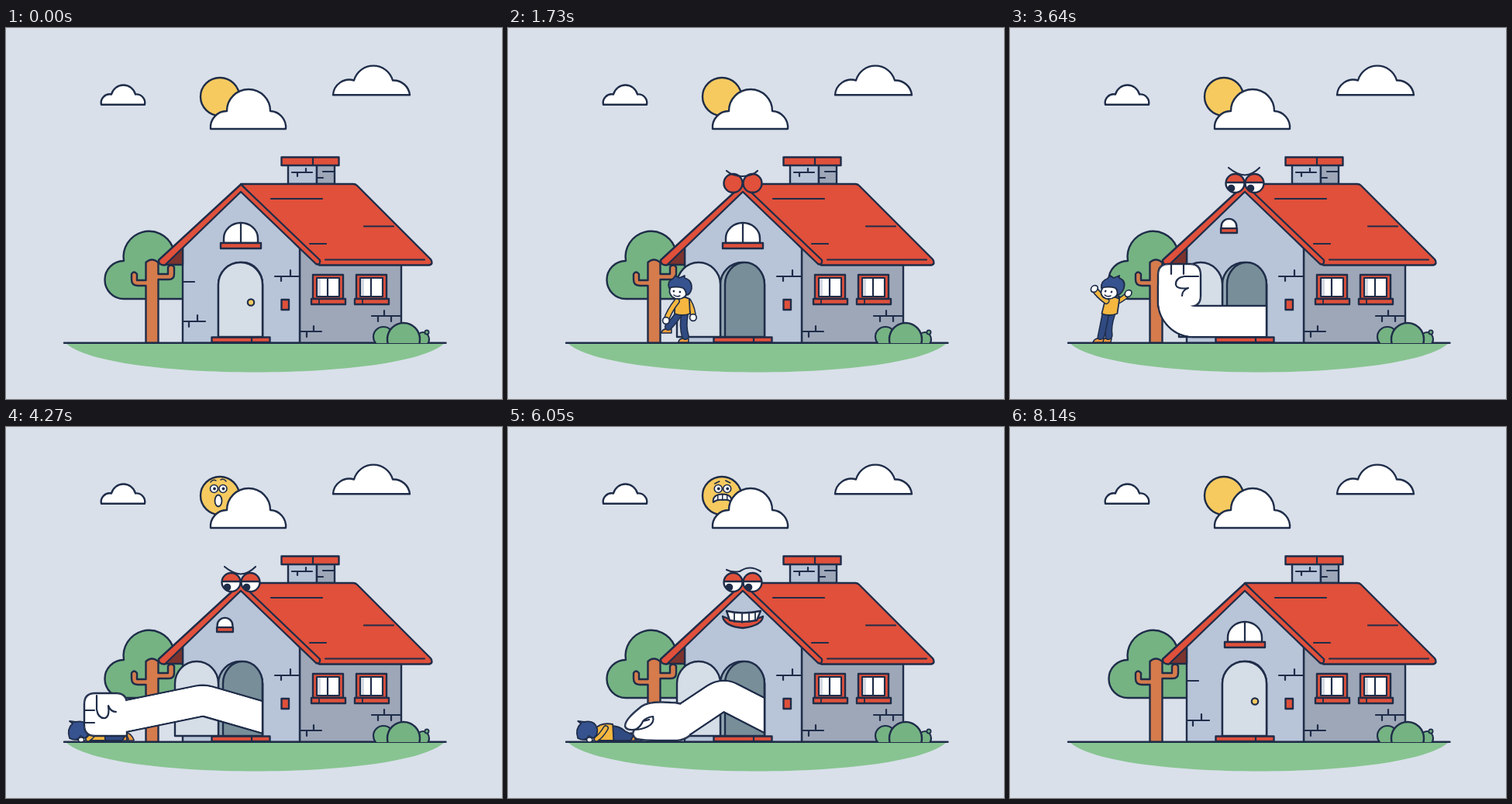
An HTML page with a canvas for the animation above (8.22 s loop, 640 px wide and 478 px high).

```html
<!DOCTYPE html>
<html lang="en">
<head>
<meta charset="utf-8">
<title>Hungry house</title>
<style>
html, body { margin: 0; width: 100%; height: 100%; overflow: hidden; background: #d9e0ea; }
canvas { display: block; }
</style>
</head>
<body>
<canvas id="stage" width="640" height="478"></canvas>
<script>
const ctx = document.getElementById('stage').getContext('2d');
const LOOP = 8220;
const INK = '#1f2d49', RED = '#e0503b', WALL = '#b8c4d8', SIDE = '#9da7b8',
  DOOR = '#d5dde7', GREEN = '#75b383', BARK = '#d57b4c', SUN = '#f6ca5f',
  SHIRT = '#f5b73f', HAIR = '#36528f', PANTS = '#304a82', SHOE = '#ee9a3d';
const DOOR_EDGE = 331;

// Eased interpolation through keys of the form [time, ...values].
function track(t, keys) {
  if (t <= keys[0][0]) return keys[0].slice(1);
  for (let i = 1; i < keys.length; i++) {
    const a = keys[i - 1], b = keys[i];
    if (t < b[0]) {
      const u = (t - a[0]) / (b[0] - a[0]);
      const e = u * u * (3 - 2 * u);
      return a.slice(1).map((v, k) => v + (b[k + 1] - v) * e);
    }
  }
  return keys[keys.length - 1].slice(1);
}
const ramp = (t, from, to) => track(t, [[from, 0], [to, 1]])[0];

function draw(d, fill, width = 2.4) {
  const path = new Path2D(d);
  if (fill) { ctx.fillStyle = fill; ctx.fill(path); }
  if (width) { ctx.strokeStyle = INK; ctx.lineWidth = width; ctx.stroke(path); }
}
const line = (d, width = 2.2) => draw(d, null, width);
const box = (x, y, w, h, fill, width) => draw(`M${x},${y}h${w}v${h}h${-w}z`, fill, width);
function oval(x, y, rx, ry, fill, width = 2.2) {
  ctx.beginPath();
  ctx.ellipse(x, y, rx, ry, 0, 0, Math.PI * 2);
  ctx.fillStyle = fill;
  ctx.fill();
  if (width) { ctx.strokeStyle = INK; ctx.lineWidth = width; ctx.stroke(); }
}
function limb(d, color, width) {
  const path = new Path2D(d);
  ctx.strokeStyle = INK; ctx.lineWidth = width + 3; ctx.stroke(path);
  ctx.strokeStyle = color; ctx.lineWidth = width; ctx.stroke(path);
}
function group(paint) { ctx.save(); paint(); ctx.restore(); }
function insideDoorway(paint) {
  group(() => {
    ctx.beginPath();
    ctx.rect(0, 0, DOOR_EDGE + 0.5, 478);
    ctx.clip();
    paint();
  });
}

function sky(t) {
  oval(276, 88.5, 25, 24.5, SUN, 2.4);
  sunFace(t);
  draw('M264,130A21,21 0 0 1 285,107A28,28 0 0 1 341,107A21,21 0 0 1 361,130z', '#fff');
  draw('M123,98.7A11,11 0 0 1 136,85.5A16,16 0 0 1 167,85.5A11,11 0 0 1 179,98.7z', '#fff');
  draw('M422,86.3A21,21 0 0 1 449,67.5A26,26 0 0 1 499,67.5A21,21 0 0 1 521,86.3z', '#fff');
}

function sunFace(t) {
  const show = ramp(t, 3980, 4120) * (1 - ramp(t, 7680, 7840));
  if (!show) return;
  const grimace = t > 5350;
  const shift = track(t, [[5250, 0], [5500, 2.5], [7200, 3.5]])[0];
  group(() => {
    ctx.globalAlpha = show;
    ctx.translate(shift, 0);
    for (const x of [268.5, 280]) {
      oval(x, 79.5, 5, 5, '#fff', 1.6);
      oval(x + 0.5, 79.5, 1.9, 1.9, INK, 0);
    }
    if (grimace) {
      line('M264,73L270,70M278,69L284,72', 1.6);
      draw('M262,97Q261,87 274,86.5Q287,87 285,96Q281,93 274,94Q267,93 262,97z', '#fff', 2);
      line('M268,88V94M274,87V93M280,88V93', 1.5);
    } else {
      line('M264,71Q267,67 271,69M277,68Q281,66 284,70', 1.5);
      oval(274, 95, 4.5, 7.5, '#fff', 1.8);
    }
  });
}

function tree() {
  draw('M152,349A24.5,24.5 0 0 1 152,300A33,33 0 0 1 215,282Q223,279 229,283V349z', GREEN);
  draw('M180.5,406V332H170Q162,332 162,324V317Q165,312 169,317V325H180.5V302'
    + 'Q188,295 196.5,302V317H209V308Q213,303 217,308V317Q217,324 210,324H196.5V406z', BARK);
}

function sideWindow(x) {
  box(x, 318, 39, 31, RED);
  box(x + 5, 322, 29, 24, '#fff', 2.2);
  box(x + 6, 323, 4, 22, '#d3d9e1', 0);
  line(`M${x + 19},322V346`);
  box(x - 2, 349, 44, 7, RED);
  line(`M${x + 8},349V356`, 1.8);
}

function house() {
  box(364, 176, 37, 25, WALL);
  box(401, 176, 23, 25, SIDE);
  line('M369,186H395M376,186V191M387,181V186M409,185H423M402,193H409');
  box(355.5, 166.5, 74, 10.5, RED);
  line('M396,167V177');

  draw('M379,280L404,305H510V406H379z', SIDE);
  draw('M228,406V272L303,206L379,284V406z', WALL);
  draw('M228,277V305H203z', '#7d332d');
  draw('M303,201H448Q451,201 453,203L548,298Q552,304 546,305.5H404z', RED);
  draw('M303,201.5L197,299Q197,306 205,305.5L303,211L400,304Q406,306 405,299z', RED);
  line('M342,220H408M462,255.5H500M392,278H413M412,298.5H540');
  line('M228,327H243M228,378H257M236,378V385M247,370V378');
  line('M347,320H379M355,320V326M367,312V320');
  line('M379,391H407M388,391V398M397,384V391M472,371H510M480,371V378M488,364V371M497,371V378');
  box(355.5, 350, 9.5, 13, RED);
  sideWindow(396);
  sideWindow(452);
}

function arch(left, right) {
  const r = Math.abs(right - left) / 2;
  return `M${left},398V330.5A${r},28.5 0 0 ${right > left ? 1 : 0} ${right},330.5V398z`;
}

function doorway(t) {
  const swing = track(t, [[190, 1], [720, -1], [7470, -1], [7920, 1]])[0];
  draw(arch(274, DOOR_EDGE), '#94a7b3');
  draw(arch(280, DOOR_EDGE), '#788f9a');
  box(265.5, 398.5, 75, 6.5, RED);
  line('M317,398V405');
  draw(arch(274, 274 + (swing > 0 ? 57 : 56) * swing), DOOR);
  if (swing > 0.1) oval(274 + 42 * swing, 353.5, 4.2 * swing, 4.2, SUN);
}

function windowMouth(t) {
  if (t > 5520 && t < 6760) {
    const grow = track(t, [[5520, 0.4], [5720, 1], [6600, 1], [6760, 0.5]])[0];
    group(() => {
      ctx.translate(303, 248);
      ctx.scale(grow, grow);
      ctx.translate(-303, -248);
      draw('M277,244Q303,256 329,244Q328,256 303,259Q279,257 277,244z', RED);
      draw('M282,237Q303,242 326,237L321,249Q303,253 286,249z', '#fff');
      line('M292,239V251M302,240V252M311,240V251M319,239V249', 1.8);
    });
    return;
  }
  const [x, y, sx, sy] = track(t, [[2080, 303, 280, 1, 1], [2350, 282.5, 259.5, 0.4, 0.47],
    [6760, 282.5, 259.5, 0.4, 0.47], [6960, 303, 280, 1, 1]]);
  const rx = 22 * sx * (1.2 - 0.2 * sx);
  const base = y - 3 * sy, half = 26 * sx;
  draw(`M${x - rx},${base}V${base - 6 * sy}A${rx},${20 * sy} 0 0 1 ${x + rx},${base - 6 * sy}V${base}z`, '#fff');
  if (sx > 0.6) line(`M${x},${base - 26 * sy}V${base}`);
  box(x - half, base, half * 2, 7 * Math.max(sy, 0.85), RED);
}

function houseEyes(t) {
  const rise = ramp(t, 1420, 1650) * (1 - ramp(t, 6720, 6960));
  if (!rise) return;
  const open = ramp(t, 1900, 2120) * (1 - ramp(t, 6540, 6720));
  group(() => {
    ctx.translate(303, 211);
    ctx.scale(rise, rise);
    ctx.translate(-303, -211);
    for (const x of [290.5, 315.5]) {
      oval(x, 200, 12, 11.8, '#fff', 0);
      group(() => {
        ctx.beginPath();
        ctx.arc(x, 200, 12, 0, Math.PI * 2);
        ctx.clip();
        oval(x - 5, 206.5, 4.8, 4.8, INK, 0);
        const lid = 212 - 13 * open;
        box(x - 13, 186, 26, lid - 186, RED, 2.4);
      });
      ctx.beginPath();
      ctx.arc(x, 200, 12, 0, Math.PI * 2);
      ctx.lineWidth = 2.4;
      ctx.stroke();
    }
    if (t > 5520) line('M282,184Q290,188 299,186Q312,177 326,186');
    else if (open < 0.5) line('M282,184Q290,191 302,191M322,184Q315,191 303,191');
    else line('M282,180Q293,189 303,189.5Q313,189 322,180');
  });
}

function walker(t) {
  const x = t < 2520 ? 224 - (t - 1730) * 0.118 : track(t, [[2520, 130.8], [3300, 120]])[0];
  const moving = 1 - ramp(t, 2350, 2520);
  const stride = Math.cos((t - 1730) / 440 * Math.PI) * moving;
  const lean = 0.2 * ramp(t, 2700, 3300);
  const [lx, ly, rx, ry] = track(t, [[2600, -20, -28, 15, -32], [3250, -25, -69, 20, -63]]);
  const sway = moving * 4 * (stride - 1);
  const foot = s => s > 0 ? [-18 * s, -12 * s] : [-4 * s, 0];
  group(() => {
    ctx.translate(x, 405 - 6 * Math.min(1, Math.max(0, (x - 268) / 10)));
    ctx.transform(1, 0, -lean, 1, 0, 0);
    [[-stride, 5], [stride, -5]].forEach(([s, side]) => {
      const [fx, fy] = foot(s);
      const px = fx + side * (1 - Math.abs(stride));
      draw(`M${px - 8},${fy}Q${px - 7},${fy - 6} ${px + 1},${fy - 5}H${px + 5}V${fy}z`, SHOE, 1.6);
      limb(`M${side * 0.8},-36Q${px * 0.55 - 1},${-20 + fy / 2} ${px + 1},${fy - 8}`, PANTS, 7);
    });
    limb(`M9,-53Q${(9 + rx) / 2 + 3},${(ry - 53) / 2} ${rx},${ry}`, SHIRT, 5);
    oval(rx, ry, 4.3, 4.3, '#fff', 1.7);
    draw('M-8,-57Q2,-61 10,-56L11,-37Q1,-33 -9,-37z', SHIRT, 1.8);
    limb(`M-6,-53Q${(lx - 6) / 2 - 3},${(ly - 53) / 2} ${lx - sway},${ly}`, SHIRT, 5);
    oval(lx - sway, ly, 4.3, 4.3, '#fff', 1.7);
    oval(-4, -66, 11.5, 10, '#fff', 1.8);
    draw('M-16,-70Q-19,-79 -11,-82L-8,-86L-3,-83L4,-86L4,-83Q14,-80 13,-69Q11,-61 6,-61Q6,-67 2,-70Q-7,-73 -16,-70z', HAIR, 1.8);
    oval(-10, -66, 1.3, 1.6, INK, 0);
    oval(-2, -65, 1.3, 1.6, INK, 0);
    line('M-10,-61Q-6,-58 -2,-60', 1.4);
  });
}

function fallen(t) {
  const dx = t < 5980 ? 8 * ramp(t, 5680, 5960) : 8 + Math.max(0, t - 6050) * 0.1754;
  if (dx > 262) return;
  const lift = -5 * Math.min(1, Math.max(0, (dx - 160) / 30));
  group(() => {
    ctx.translate(dx, lift);
    draw('M148,404L150,394Q155,394 158,402L157,404zM156,404L155,394Q161,394 165,403V404z', SHOE, 1.6);
    draw('M124,385Q136,385 143,392L154,397L150,404H122z', PANTS, 1.8);
    draw('M104,389Q112,380 127,383L128,404H106z', SHIRT, 1.8);
    oval(98, 399, 9, 5.5, '#fff', 1.7);
    draw('M82,401Q78,389 86,382L82,379L90,380Q104,377 107,389Q108,397 102,401L96,398Q92,406 82,401z', HAIR, 1.8);
    limb('M118,388Q112,398 106,402', SHIRT, 4.5);
    oval(97, 403, 3.6, 3, '#fff', 1.6);
  });
}

// Elbow x/y, wrist x/y and hand angle in degrees (0 is up, -90 is left).
const ARM = [
  [2700, 430, 378, 380, 378, -90],
  [3120, 250, 378, 205, 378, -90],
  [3400, 211, 378, 211, 345, 0],
  [3640, 211, 378, 211, 331, 0],
  [3860, 211, 378, 211, 276, 6],
  [4010, 255, 352, 128, 378, -90],
  [4300, 255, 352, 128, 378, -90],
  [4700, 211, 378, 211, 278, 0],
  [5130, 211, 378, 211, 278, 0],
  [5580, 275, 338, 212, 376, -90],
  [5780, 277, 344, 212, 382, -90],
  [5960, 277, 344, 220, 382, -90],
  [6050, 277, 344, 220, 382, -90]
];
const FIST = 'M-6,-27H21Q35,-27 35,-13V14Q35,28 21,28H-20V-13Q-20,-27 -6,-27z';
const PALM = 'M10,-22Q2,-27 -10,-27C-24,-28 -40,-28 -48,-22C-58,-14 -70,-4 -69,4'
  + 'Q-67,9 -57,8Q-62,15 -54,20Q-45,22 -28,22H-2Q8,21 15,15z';

function arm(t) {
  if (t < 2700 || t > 7200) return;
  let [ex, ey, wx, wy, angle] = track(t, ARM);
  if (t > 6050) {
    const pull = (t - 6050) * 0.1754;
    ex += pull;
    wx += pull;
    ey += Math.min(30, pull * 0.2);
  }
  const grabbing = t > 5260;
  const hand = new Path2D(grabbing ? PALM : FIST);
  const turn = (angle + (grabbing ? 90 : 0)) * Math.PI / 180;
  const sx = Math.max(345, ex + 70);
  const reach = Math.hypot(wx - ex, wy - ey);
  const bend = new Path2D();
  bend.moveTo(sx, grabbing ? track(t, [[5260, 378], [5580, 380]])[0] : 378);
  bend.arcTo(ex, ey, wx, wy, Math.min(grabbing ? 18 : 26, reach * 0.75));
  bend.lineTo(wx, wy);
  const atWrist = paint => group(() => {
    ctx.translate(wx, wy);
    ctx.rotate(turn);
    paint();
  });

  insideDoorway(() => {
    ctx.lineCap = 'butt';
    ctx.strokeStyle = INK;
    ctx.lineWidth = 42.4;
    ctx.stroke(bend);
    atWrist(() => { ctx.lineWidth = 2.4; ctx.stroke(hand); });
    ctx.strokeStyle = '#fff';
    ctx.lineWidth = 37.6;
    ctx.stroke(bend);
    ctx.lineCap = 'round';
    atWrist(() => {
      // Shrinking the fill keeps the full outline around the hand.
      ctx.fillStyle = '#fff';
      ctx.save();
      ctx.clip(hand);
      ctx.fill(hand);
      ctx.strokeStyle = INK;
      ctx.lineWidth = 2.4;
      ctx.stroke(hand);
      ctx.restore();
    });
    ctx.lineCap = 'butt';
    ctx.strokeStyle = '#fff';
    ctx.lineWidth = 37.6;
    ctx.stroke(bend);
    ctx.lineCap = 'round';
    atWrist(() => {
      if (grabbing) line('M-57,8Q-50,6 -46,-3Q-42,-8 -33,-9Q-31,0 -40,4Q-48,8 -57,8M-46,-3L-38,-5');
      else line('M-3,-26V-14M13,-26V-14M32,-11H14Q2,-9 3,0Q5,6 19,4Q11,7 11,14');
    });
  });
  line(`M${DOOR_EDGE},330V398`, 2.4);
}

function bush() {
  group(() => {
    ctx.beginPath();
    ctx.rect(460, 370, 100, 36);
    ctx.clip();
    oval(487, 398, 13, 13, GREEN);
    oval(538, 401, 8, 9, GREEN);
    oval(543, 392, 2.6, 2.6, GREEN, 1.8);
    oval(513, 401, 21, 21, GREEN, 2.4);
  });
}

function ground() {
  draw('M77,406C130,456 513,456 566,406z', '#88c491', 0);
  line('M75,405.8H567.5', 2.4);
}

function frame(now) {
  const t = now % LOOP;
  ctx.lineCap = ctx.lineJoin = 'round';
  ctx.fillStyle = '#d9e0ea';
  ctx.fillRect(0, 0, 640, 478);
  sky(t);
  tree();
  house();
  ground();
  doorway(t);
  windowMouth(t);
  houseEyes(t);
  bush();
  insideDoorway(() => {
    if (t > 600 && t < 4010) walker(t);
    else if (t >= 4010) fallen(t);
  });
  arm(t);
}

const start = performance.now();
function tick() {
  frame(performance.now() - start);
  requestAnimationFrame(tick);
}
tick();
</script>
</body>
</html>
```
